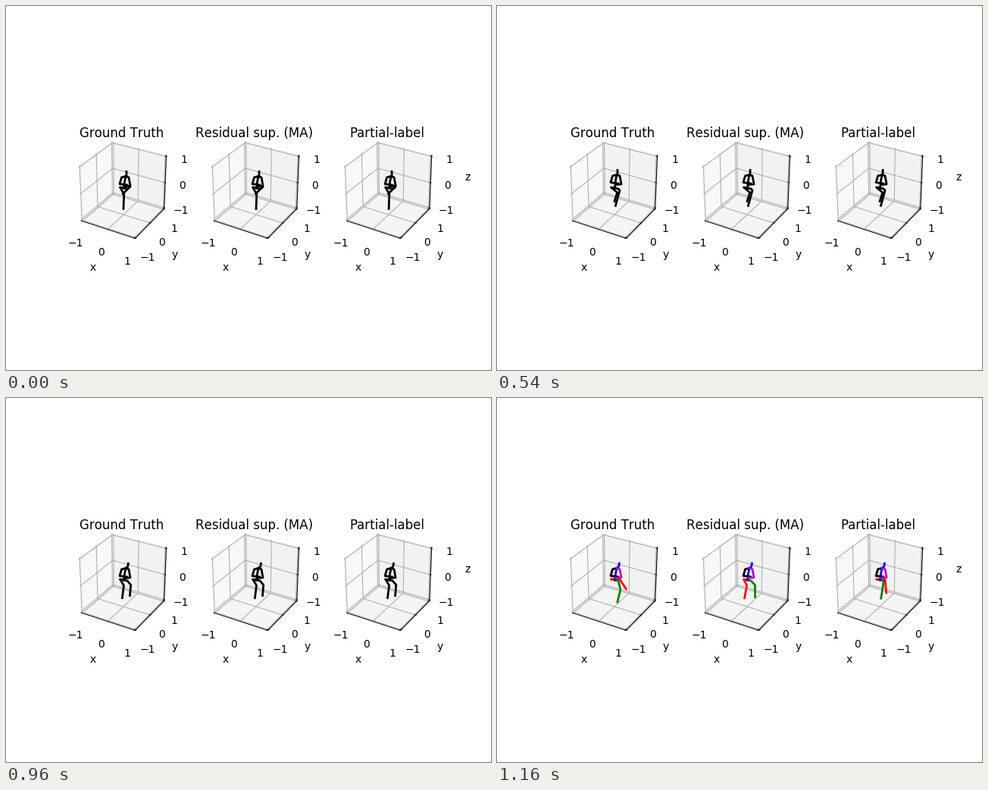
Write a matplotlib script that moves like this. It is 640 by 480 pixels and loops after 1.18 s.

```python
import numpy as np
import matplotlib.pyplot as plt
from matplotlib.animation import FuncAnimation
from matplotlib.patches import Polygon

W, H, DPI = 640, 480, 100
FRAMES, STEP = 59, 20
SEED_END = 980          # ms: observed motion ends, predictions start
SIZE = 0.775 * W / 3.4  # side of a square panel
PITCH = 1.2 * SIZE
LEFT, BOTTOM = 0.125 * W, H * 0.505 + SIZE / 2
EDGE = 1 + 1 / 24       # panes reach slightly past the limits

plt.rcParams["font.family"] = "DejaVu Sans"
plt.rcParams["text.kerning_factor"] = 6
fig = plt.figure(figsize=(W / DPI, H / DPI), dpi=DPI)
ax = fig.add_axes([0, 0, 1, 1])
ax.set_xlim(0, W)
ax.set_ylim(H, 0)
ax.axis("off")

# Camera at elevation 30, azimuth -60, distance 10.
elev, azim = np.radians(30), np.radians(-60)
N = np.array([np.cos(azim) * np.cos(elev), np.sin(azim) * np.cos(elev), np.sin(elev)])
U = np.array([-np.sin(azim), np.cos(azim), 0])
V = np.cross(N, U)


def project(points, panel):
    p = np.atleast_2d(points) / 2
    depth = 10 - p @ N
    x = (p @ U / depth + 0.095) / 0.185
    y = (p @ V / depth + 0.095) / 0.185
    return np.column_stack([LEFT + panel * PITCH + x * SIZE, BOTTOM - y * SIZE])


def line3d(points, panel, color):
    x, y = project(points, panel).T
    return ax.plot(x, y, color=color, lw=0.8)[0]


def text3d(point, panel, s, va):
    x, y = project(point, panel)[0]
    ax.text(x, y, s, size=10, ha="center", va=va)


def with_coord(base, index, value):
    p = np.array(base, float)
    p[index] = value
    return p


def label_offset(points):
    return points * 48 / (2 * SIZE * 72 / DPI) / 6


# name, position of the axis edge, tick direction
AXES = [("x", (0, -1, -1), 1), ("y", (1, 0, -1), 0), ("z", (1, 1, 0), 0)]
BACK = np.array([-1, 1, -1]) * EDGE
SHADES = [0.95, 0.90, 0.925]
panes, grid = [], []


def draw_pane(panel, i):
    a, b = [k for k in range(3) if k != i]
    corners = []
    for sa, sb in [(-1, -1), (1, -1), (1, 1), (-1, 1)]:
        corners.append(with_coord(with_coord(BACK, a, sa * EDGE), b, sb * EDGE))
    color = (SHADES[i],) * 3 + (0.5,)
    patch = Polygon(project(corners, panel), fc=color, ec=color, lw=1)
    panes.append((ax.add_patch(patch), color))


def draw_axis(panel, i):
    name, outward, tick_dir = AXES[i]
    outward = np.array(outward)
    edge = outward * EDGE
    a, b = [k for k in range(3) if k != i]
    line3d([with_coord(edge, i, -EDGE), with_coord(edge, i, EDGE)], panel, "k")
    for value in (-1, 0, 1):
        corner = with_coord(BACK, i, value)
        path = [with_coord(corner, a, -BACK[a]), corner, with_coord(corner, b, -BACK[b])]
        grid.append(line3d(path, panel, "#b0b0b0"))
    for value in (-1, 0, 1):
        pos = with_coord(edge, i, value)
        side = outward[tick_dir] / 6
        tick = [with_coord(pos, tick_dir, edge[tick_dir] + k * side) for k in (0.1, -0.2)]
        line3d(tick, panel, "k")
        label = str(value).replace("-", "\u2212")
        text3d(pos + outward * label_offset(11.5), panel, label, "top")
    if name != "z" or panel == 2:
        text3d(edge + outward * label_offset(25), panel, name, "center")


def draw_panel(panel, title):
    for i in range(3):
        draw_pane(panel, i)
    for i in range(3):
        draw_axis(panel, i)
    ax.text(LEFT + panel * PITCH + SIZE / 2, BOTTOM - 0.92 * SIZE - 6 * DPI / 72,
            title, size=12, ha="center", va="baseline")


def legs(*values):
    """Right knee, right foot, left knee, left foot."""
    return np.array(values, float).reshape(4, 2)


# Observed gait: a mean stance plus a sway and a bob.
STANCE = legs(157.6, 248.5, 154.4, 264, 161.8, 242.3, 155.4, 254)
SWAY = legs(0.4, 1.5, -0.6, 1.5, -1.2, 1.7, 0, -1.5)
BOB = legs(-1.5, 1, 0, 5, 1, -2.5, -1, -8)

# Predictions: a starting pose moved by some share of one stride.
APART = legs(155.3, 246.5, 153.3, 262.7, 165.2, 247.2, 165, 263)
TOGETHER = legs(159, 243, 156, 262, 160, 247, 159.3, 261.5)
STRIDE = legs(6.5, -7.5, 17, -11, -2.3, 5.5, -6, 6)
PREDICTIONS = [(APART, 1), (APART, -0.1), (TOGETHER, 0.45)]

PELVIS = np.array([155.5, 240])
COLORS = ["r", "g", "b", "k", "m"]
GRAYS = ["#2c2c2c", "#303030", "#606060", "#000000", "#707070"]


def leg_pose(t, panel, sway, bob):
    if t < SEED_END:
        gait = STANCE + sway * SWAY + bob * BOB
        return gait + (APART - gait) * np.clip((t - 840) / 140, 0, 1)
    start, share = PREDICTIONS[panel]
    return start + share * STRIDE * max(0, (t - 1000) / 160)


def limbs(t, panel):
    bob = np.cos(2 * np.pi * t / 1040)
    sway = -np.cos(2 * np.pi * min(t, 860) / 540)
    rknee, rfoot, lknee, lfoot = leg_pose(t, panel, sway, bob)
    chest = np.array([158, 223.5 + bob])
    head = (160.3 + 1.3 * sway, 217.3 + bob)
    neck = chest + (1.8 + 0.8 * sway, -1.5)
    return [
        [PELVIS, PELVIS + (-5, -1), rknee, rfoot],
        [PELVIS, PELVIS + (4.5, 1), lknee, lfoot],
        [PELVIS, chest + (-1.5, 7.5), chest, neck, head],
        [chest, chest + (-5.5, 1.5), chest + (-8, 10.2), chest + (1.5, 11.5)],
        [chest, chest + (4, 1.5), chest + (6, 12.5), chest + (-1, 13.2)],
    ]


for k, name in enumerate(["Ground Truth", "Residual sup. (MA)", "Partial-label"]):
    draw_panel(k, name)
figures = [[ax.plot([], [], lw=2)[0] for _ in COLORS] for _ in range(3)]


def draw(i):
    t = i * STEP
    gray = t == SEED_END  # the first predicted frame flashes gray
    fig.set_facecolor("#d0d0d0" if gray else "white")
    for patch, color in panes:
        patch.set_facecolor("#cecece" if gray else color)
        patch.set_edgecolor("#cecece" if gray else color)
    for line in grid:
        line.set_color("#9a9a9a" if gray else "#b0b0b0")

    colors = ["k"] * 5 if t < SEED_END else GRAYS if gray else COLORS
    for k, lines in enumerate(figures):
        for line, points, color in zip(lines, limbs(t, k), colors):
            x, y = np.array(points).T
            line.set_data(x + k * PITCH, y)
            line.set_color(color)
    return []


anim = FuncAnimation(fig, draw, frames=FRAMES, interval=STEP, repeat=True, repeat_delay=0)
plt.show()
```
